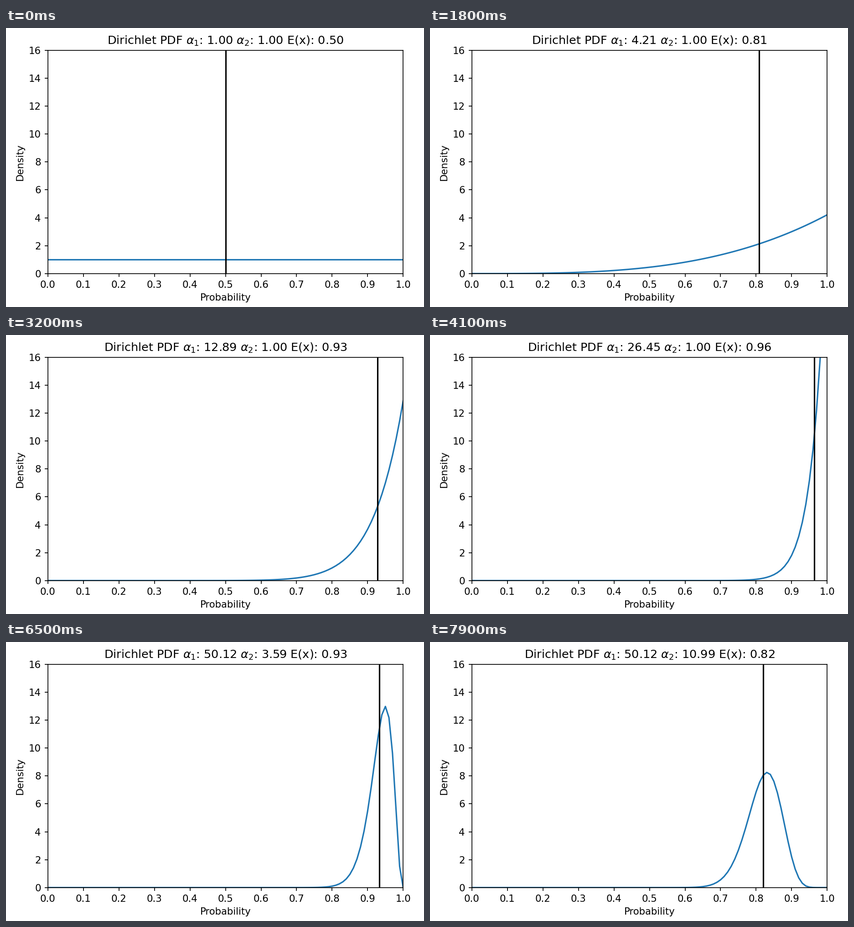
These frames come from a looping animation (917x611 px, 8 s). A matplotlib script:

```python
import math

import numpy as np
import matplotlib.pyplot as plt
from matplotlib.animation import FuncAnimation

W, H, DPI = 917, 611, 152.75
FRAMES, INTERVAL = 80, 100
STEPS = 49          # steps each alpha takes to climb from 1 to 10**TOP
TOP = 1.7
LEFT, RIGHT, TOP_EDGE, BOTTOM = 91.8, 871.3, 48.9, 537.8

x = np.linspace(0, 1, 101)


def alpha(step):
    """Log-spaced parameter, held at both ends."""
    return 10 ** (TOP * min(max(step, 0), STEPS) / STEPS)


def density(a, b):
    scale = math.exp(math.lgamma(a + b) - math.lgamma(a) - math.lgamma(b))
    return scale * x ** (a - 1) * (1 - x) ** (b - 1)


plt.rcParams["font.family"] = "DejaVu Sans"
# tiny nudge keeps the pixel size from truncating
fig = plt.figure(figsize=((W + 1e-6) / DPI, (H + 1e-6) / DPI), dpi=DPI,
                 facecolor="white")
ax = fig.add_axes([LEFT / W, 1 - BOTTOM / H,
                   (RIGHT - LEFT) / W, (BOTTOM - TOP_EDGE) / H])
ax.set(xlim=(0, 1), ylim=(0, 16), xlabel="Probability", ylabel="Density")
ax.set_xticks(np.arange(11) / 10)
ax.set_yticks(range(0, 17, 2))

curve, = ax.plot(x, density(1, 1), color="C0", lw=1.5)
mean_line = ax.axvline(0.5, color="black", lw=1.5)
title = ax.set_title("", fontsize=12)


def update(i):
    a, b = alpha(i), alpha(i - STEPS)
    mean = a / (a + b)
    curve.set_ydata(density(a, b))
    mean_line.set_xdata([mean, mean])
    title.set_text(rf"Dirichlet PDF $\alpha_1$: {a:.2f} $\alpha_2$: {b:.2f} "
                   f"E(x): {mean:.2f}")
    return curve, mean_line, title


anim = FuncAnimation(fig, update, frames=FRAMES, interval=INTERVAL,
                     init_func=lambda: update(0), repeat=True,
                     repeat_delay=0, blit=False)
plt.show()
```
